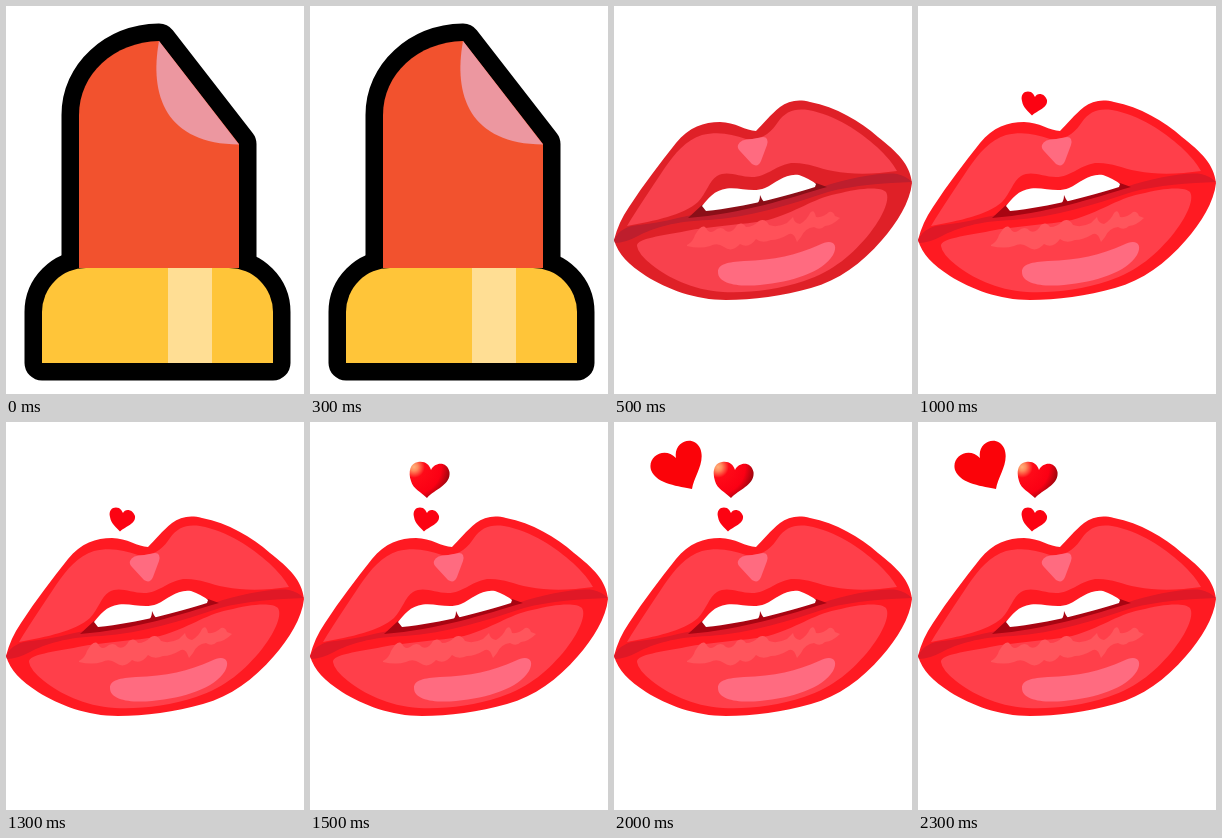
An HTML page for the animation above (2500 ms loop, 298 by 388 pixels).

```html
<!DOCTYPE html>
<html lang="en">
<head>
<meta charset="utf-8">
<title>Lipstick and kiss</title>
<style>
html, body { margin: 0; width: 100%; height: 100%; overflow: hidden; background: #fff; }
svg { display: block; width: 100%; height: 100%; }

.scene { animation: 2500ms step-end infinite; }
.stick { animation-name: stick; }
.muted { animation-name: muted; --edge: #df2027; --skin: #f8414d; --seam: #be1e2d; --crease: #ff5159; --shine: #ff6b80; --gap: #8b0f18; }
.vivid { animation-name: vivid; --edge: #ff1a22; --skin: #ff3f4a; --seam: #e01826; --crease: #ff555c; --shine: #ff6b80; --gap: #a80512; }
.second { animation-name: second; }
.third { animation-name: third; }

@keyframes stick { 0% { visibility: visible } 20%, 100% { visibility: hidden } }
@keyframes muted { 0% { visibility: hidden } 20% { visibility: visible } 40%, 100% { visibility: hidden } }
@keyframes vivid { 0% { visibility: hidden } 40%, 100% { visibility: visible } }
@keyframes second { 0% { visibility: hidden } 60%, 100% { visibility: visible } }
@keyframes third { 0% { visibility: hidden } 80%, 100% { visibility: visible } }

.edge { fill: var(--edge); }
.skin { fill: var(--skin); }
.seam { fill: var(--seam); }
.crease { fill: var(--crease); }
.shine { fill: var(--shine); }
.gap { fill: var(--gap); }
</style>
</head>
<body>
<svg viewBox="0 0 298 388" preserveAspectRatio="none">
  <defs>
    <radialGradient id="gloss" gradientUnits="userSpaceOnUse" cx="104" cy="45" r="40">
      <stop offset="0" stop-color="#ffb07a"/>
      <stop offset=".1" stop-color="#ff8a5c"/>
      <stop offset=".27" stop-color="#ff0a18"/>
      <stop offset=".68" stop-color="#fb0014"/>
      <stop offset=".95" stop-color="#8c060c"/>
    </radialGradient>

    <path id="bullet" d="M73 262V109C73 68 108 36 153 35L233 138V262Z"/>
    <path id="base" d="M36 357V306A44 44 0 0 1 80 262H223A44 44 0 0 1 267 306V357Z"/>

    <g id="lips">
      <path class="edge" d="M0 234C3 222 8 211 15 201C30 178 46 157 62 137C75 121 90 116 106 116C121 116 132 125 142 125C149 118 156 109 166 101C174 95 184 93 196 96C222 101 246 115 264 131C283 146 296 158 298 177C296 196 283 217 268 234C247 258 225 274 197 282C169 290 139 294 112 294C81 294 53 283 32 270C15 259 4 248 0 234Z"/>
      <path class="skin" d="M13 220C24 202 38 181 50 163C61 147 72 134 88 129C104 125 118 128 132 133C149 135 158 125 164 116C171 106 180 102 194 104C222 109 246 126 263 141Q277 154 283 165C261 168 240 169 219 165C203 162 193 156 177 157C160 160 153 171 138 171C124 171 114 164 103 170C95 175 92 188 84 196C70 209 40 215 13 220Z"/>
      <path class="skin" d="M23 240C23 232 48 230 72 225C96 220 129 219 154 214C183 206 198 193 222 188C245 182 266 180 272 186C277 194 267 213 256 227C239 248 220 265 190 275C163 284 136 287 109 286C78 284 53 271 38 259Q24 248 23 240Z"/>
      <path class="seam" d="M0 234C5 224 13 220 25 219C46 217 62 212 78 209C128 205 170 193 208 181C235 172 267 166 283 168Q292 170 298 176C271 177 240 179 214 186C175 199 137 211 95 214C61 215 39 222 24 230Q11 237 1 237Z"/>
      <path class="gap" d="M74 212L88 199L202 177L213 181C176 192 127 208 74 212Z"/>
      <path fill="#fff" d="M88 200C94 193 100 184 113 182.500C126 181 139 187 151 182C162 177 171 167 185 169Q196 173 202 178L201 181C172 190 132 201 92 205Z"/>
      <path class="gap" d="M143 198Q146 195 146 189Q148 194 150 196Z"/>
      <path class="crease" d="M73 239Q79 236 81 229Q88 217 92 222Q95 228 100 225Q107 219 112 225Q118 228 123 219Q128 215 132 221Q139 221 145 215Q151 212 155 219Q163 222 173 217L179 211Q180 217 186 218Q193 214 196 207Q200 202 202 211Q209 212 215 206Q219 205 221 210L226 212Q219 219 211 220Q206 225 200 221Q191 222 187 231L183 236Q180 226 175 228Q165 234 157 234Q148 238 142 233Q135 243 126 238Q118 247 110 241Q103 236 96 240Q86 243 73 240Z"/>
      <path class="shine" d="M104 266C104 258 114 256 130 255C160 254 183 249 205 239C218 232 225 238 219 249C209 266 178 276 146 279C124 281 104 278 104 266Z"/>
      <path class="shine" d="M124 139Q126 133 138 133L149 131Q155 131 153 139L147 155Q144 162 138 158L126 145Q123 142 124 139Z"/>
    </g>
  </defs>

  <g class="scene stick">
    <g stroke="#000" stroke-width="35" stroke-linejoin="round">
      <use href="#bullet"/>
      <use href="#base"/>
    </g>
    <use href="#bullet" fill="#f2522e"/>
    <path fill="#ec97a0" d="M153 35C143 90 160 138 233 138.500Z"/>
    <use href="#base" fill="#ffc539"/>
    <path fill="#ffde94" d="M162 262H206V357H162Z"/>
  </g>

  <g class="scene muted"><use href="#lips"/></g>

  <g class="scene vivid">
    <use href="#lips"/>
    <path fill="#fc0312" d="M114 109.500C111 106 105 102 104 95C102 87 108 84 113 86Q116 88 117 91C119 86 127 87 129 94C130 102 120 104 114 109.500Z"/>
  </g>

  <path class="scene second" fill="url(#gloss)" d="M117 76C111 70 103 67 101 59C98 50 100 41 108 40C115 39 119 42 121 48C125 40 137 39 139.500 50C141 63 125 67 117 76Z"/>

  <path class="scene third" fill="#fb0309" d="M78 67C66 64 43 63 37 48C33 34 51 24 62 36C59 20 79 12 86 26C92 40 80 54 78 67Z"/>
</svg>
</body>
</html>
```
